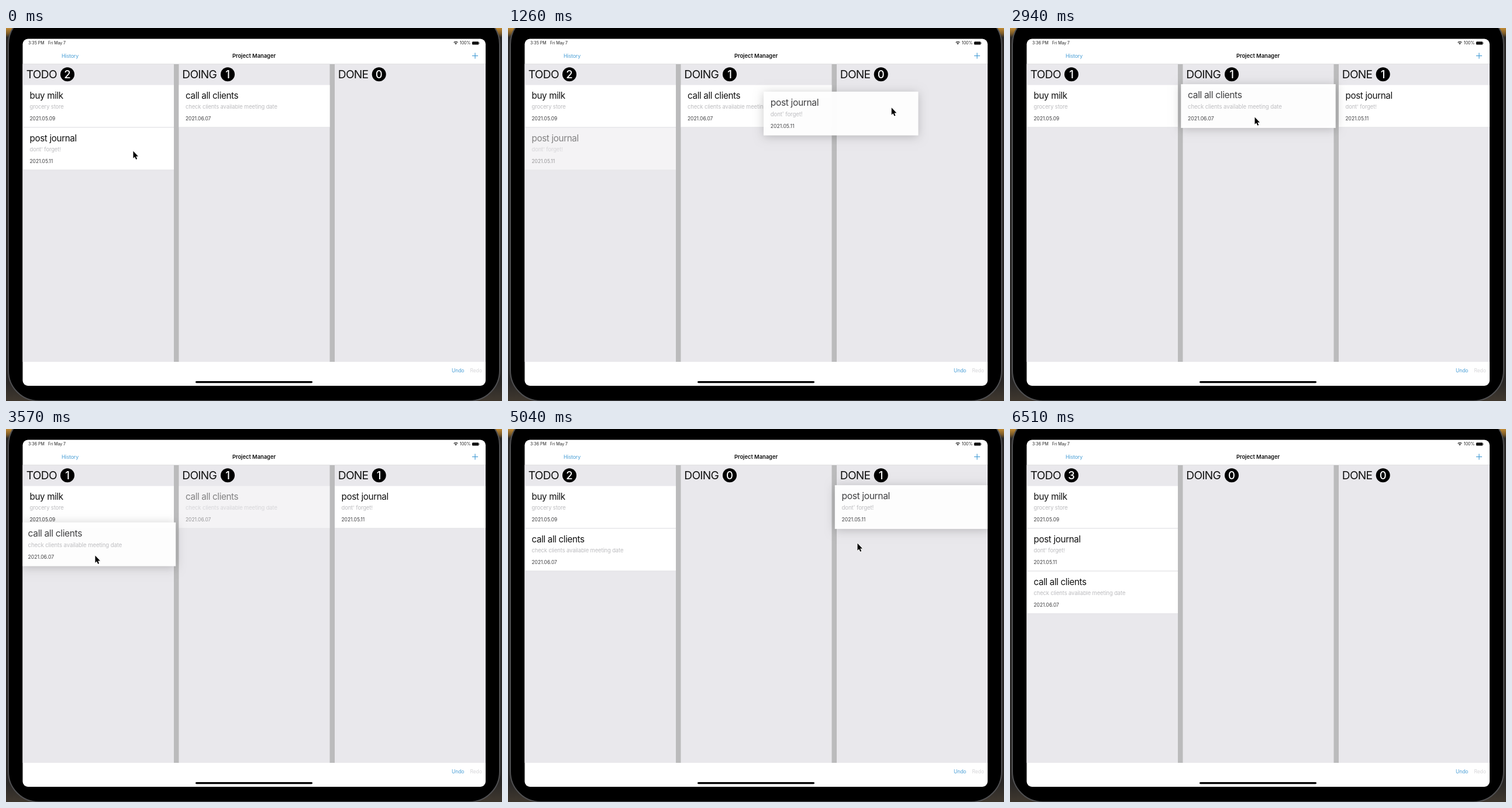
Write an HTML page with a canvas that moves like this. It is 848 px wide and 638 px high and loops after 6650 ms.

```html
<!DOCTYPE html>
<html lang="en">
<head>
<meta charset="utf-8">
<title>Task board</title>
<style>
  html, body { margin: 0; width: 100%; height: 100%; overflow: hidden; background: #000; }
  canvas { display: block; width: 848px; height: 638px; }
</style>
</head>
<body>
<canvas id="stage" width="848" height="638"></canvas>
<script>
const ctx = document.getElementById('stage').getContext('2d');
const LOOP = 6650, STEP = 70, DROP_TIME = 335;
const LEFT = 29, COL_W = 258, COL_PITCH = 266.5, TOP = 97.5, ROW_H = 72, PITCH = 73;
const BLUE = '#4a9fd6', BOARD = '#e9e8ec';

const milk = ['buy milk', 'grocery store', '2021.05.09'];
const journal = ['post journal', "dont' forget!", '2021.05.11'];
const clients = ['call all clients', 'check clients available meeting date', '2021.06.07'];

const clamp = v => Math.max(0, Math.min(1, v));
const ramp = (t, a, b) => clamp((t - a) / (b - a));
const smooth = (t, a, b) => { const p = ramp(t, a, b); return p * p * (3 - 2 * p); };
const mix = (a, b, p) => ({ x: a.x + (b.x - a.x) * p, y: a.y + (b.y - a.y) * p });
const colX = col => LEFT + col * COL_PITCH;
const slot = (col, index) => ({ x: colX(col) + COL_W / 2, y: TOP + PITCH * index + 36 });

// The pointer rests between moves.
const moves = [
  { from: 350, to: 770, x: 508, y: 138 },
  { from: 910, to: 1540, x: 773, y: 134 },
  { from: 1750, to: 2590, x: 418, y: 152 },
  { from: 3010, to: 3570, x: 152, y: 216 },
  { from: 3990, to: 4410, x: 652, y: 141 },
  { from: 4900, to: 5040, x: 597, y: 195 },
  { from: 5040, to: 5460, x: 242, y: 169 },
  { from: 5950, to: 6230, x: 232, y: 507 },
  { from: 6370, to: 6510, x: 320, y: 693 }
];

// grip: card centre relative to the pointer while dragged.
const drags = [
  { task: journal, lift: 70, pull: 350, drop: 1540, home: slot(0, 1), grip: { x: -86, y: 10.5 }, end: { x: 725, y: 123 } },
  { task: clients, lift: 2800, pull: 3010, drop: 3780, home: slot(1, 0), grip: { x: 6, y: -18.8 }, end: slot(0, 1) },
  { task: journal, lift: 4760, pull: 5040, drop: 5530, home: slot(2, 0), grip: { x: 40.5, y: -5.5 }, end: slot(0, 1) }
];

const pointer = t => moves.reduce((p, m) => mix(p, m, ramp(t, m.from, m.to)), { x: 217, y: 210 });

function box(x, y, w, h, color) {
  ctx.fillStyle = color;
  ctx.fillRect(x, y, w, h);
}

function pill(x, y, w, h, r, color) {
  ctx.fillStyle = color;
  ctx.beginPath();
  ctx.roundRect(x, y, w, h, r);
  ctx.fill();
}

function label(str, x, y, size, color, gap = 0, weight = 400, align = 'left') {
  ctx.font = `${weight} ${size}px Inter, "Open Sans", sans-serif`;
  ctx.letterSpacing = gap + 'px';
  ctx.textAlign = align;
  ctx.fillStyle = color;
  ctx.fillText(str, x, y);
}

function rowText(task, ink = '#111') {
  label(task[0], 11.5, 23.5, 15.2, ink, -0.35);
  label(task[1], 11.5, 40.7, 9.4, '#bcbcbf', -0.1);
  label(task[2], 11.5, 60.5, 8.4, '#3c3c3e');
}

function row(task, col, y, alpha = 1) {
  if (alpha <= 0) return;
  ctx.save();
  ctx.globalAlpha = alpha;
  ctx.translate(colX(col), TOP + y);
  box(0, 0, COL_W, ROW_H, '#fff');
  box(0, ROW_H, COL_W, 0.8, '#e2e2e4');
  rowText(task);
  ctx.restore();
}

function card(drag, t) {
  const done = drag.drop + DROP_TIME;
  if (t < drag.lift || t >= done) return;
  const fall = smooth(t, drag.drop, done);
  const p = pointer(Math.min(t, drag.drop));
  const held = { x: p.x + drag.grip.x, y: p.y + drag.grip.y };
  const at = mix(mix(drag.home, held, smooth(t, drag.pull, drag.pull + 140)), drag.end, fall);
  const scale = 1 + 0.025 * ramp(t, drag.lift - STEP, drag.lift + 140) - 0.66 * fall;
  ctx.save();
  ctx.globalAlpha = 0.97 * (1 - fall * fall);
  ctx.translate(at.x, at.y);
  ctx.scale(scale, scale);
  ctx.translate(-COL_W / 2, -36.5);
  ctx.shadowColor = `rgba(0,0,0,${0.22 - 0.1 * fall})`;
  ctx.shadowBlur = 16 - 10 * fall;
  ctx.shadowOffsetY = 2 - 2 * fall;
  box(0, 0, COL_W, 73 + 6 * fall, '#fff');
  ctx.shadowColor = 'transparent';
  ctx.globalAlpha *= 1 - 0.6 * fall;
  rowText(drag.task, '#3a3a3c');
  ctx.restore();
}

function device() {
  const side = ctx.createLinearGradient(0, 0, 0, 638);
  side.addColorStop(0, '#c08a35');
  side.addColorStop(0.015, '#7a5a28');
  side.addColorStop(0.025, '#2a2827');
  side.addColorStop(0.95, '#2a2827');
  side.addColorStop(1, '#40382f');
  box(0, 0, 848, 638, side);
  pill(4, -24, 840, 662, 52, '#000');
  ctx.lineWidth = 2;
  ctx.strokeStyle = '#505052';
  ctx.stroke();
}

function statusBar(t) {
  label(t < 2100 ? '3:35 PM' : '3:36 PM', 38, 28, 7, '#222');
  label('Fri May 7', 72, 28, 6.95, '#222');
  label('100%', 775.8, 28, 7, '#222');
  ctx.strokeStyle = '#222';
  ctx.lineWidth = 1.2;
  for (const r of [2.4, 4.6]) {
    ctx.beginPath();
    ctx.arc(769, 28, r, -Math.PI * 0.76, -Math.PI * 0.24);
    ctx.stroke();
  }
  box(768.3, 26.8, 1.4, 1.4, '#222');
  pill(796.8, 23.2, 11.6, 5.2, 1.5, '#111');
  box(809, 24.8, 0.8, 2, '#777');
}

function bars() {
  label('History', 95, 50.5, 8.9, BLUE, -0.15);
  label('Project Manager', 424, 50.7, 9.4, '#111', -0.03, 600, 'center');
  box(797, 46.9, 10, 1.2, BLUE);
  box(801.4, 42.5, 1.2, 10, BLUE);
  label('Undo', 762, 589.2, 8.5, BLUE, -0.1);
  label('Redo', 793.5, 589.2, 8.5, '#d6d6d9', -0.1);
  pill(324, 604, 200, 3.2, 1.6, '#000');
}

function heading(name, col, badge, count) {
  label(name, colX(col) + 5.8, 86.3, 19.2, '#111', -0.75);
  ctx.fillStyle = '#000';
  ctx.beginPath();
  ctx.arc(badge, 79.3, 12, 0, 7);
  ctx.fill();
  label(String(count), badge, 86, 18.5, '#fff', 0, 500, 'center');
}

function board(t) {
  const [one, two, three] = drags.map(d => smooth(t, d.drop, d.drop + DROP_TIME));
  const dim = drags.map(d => t >= d.lift + STEP && t <= d.drop ? 0.5 : 1);
  const hover = smooth(t, 630, 770) * (1 - smooth(t, 910, 980));
  const room = PITCH * smooth(t, 5370, 5670);

  box(28, 62, 792, 509, BOARD);
  box(28, 61.3, 792, 0.7, '#d4d4d6');
  for (const col of [1, 2]) box(colX(col) - 8.5, 62, 8.5, 509, '#bbbbbc');

  ctx.save();
  ctx.beginPath();
  ctx.rect(28, TOP - 0.5, 792, 571 - TOP);
  ctx.clip();
  if (one < 1) row(journal, 0, PITCH * (1 - one), dim[0]);
  row(clients, 0, PITCH + room, two);
  row(journal, 0, PITCH, three);
  row(milk, 0, 0);
  if (two < 1) row(clients, 1, 16 * hover - PITCH * two, dim[1]);
  row(clients, 1, 0, 0.5 * hover);
  if (three < 1) row(journal, 2, -PITCH * three, one * dim[2]);
  ctx.restore();

  const a = one > 0, b = two > 0, c = three > 0;
  heading('TODO', 0, 105, 2 - a + b + c);
  heading('DOING', 1, 379, 1 - b);
  heading('DONE', 2, 637.7, a - c);
}

function arrow(t) {
  const { x, y } = pointer(t);
  ctx.save();
  ctx.translate(x, y);
  ctx.beginPath();
  for (const [px, py] of [[0.5, 0.5], [0.5, 12.8], [3.2, 10.2], [5.2, 14.8], [7.2, 14], [5.2, 9.6], [9, 9.4]])
    ctx.lineTo(px, py);
  ctx.closePath();
  ctx.lineWidth = 1.6;
  ctx.lineJoin = 'round';
  ctx.strokeStyle = '#fff';
  ctx.stroke();
  ctx.fillStyle = '#000';
  ctx.fill();
  ctx.restore();
}

function draw(t) {
  device();
  ctx.save();
  pill(28.5, 18.5, 791.5, 593.5, 9, '#fff');
  ctx.clip();
  statusBar(t);
  board(t);
  bars();
  for (const drag of drags) card(drag, t);
  ctx.restore();
  arrow(t);
}

const start = performance.now();
function tick() {
  const t = (performance.now() - start) % LOOP;
  draw(Math.floor(t / STEP) * STEP);
  requestAnimationFrame(tick);
}
tick();
</script>
</body>
</html>
```
